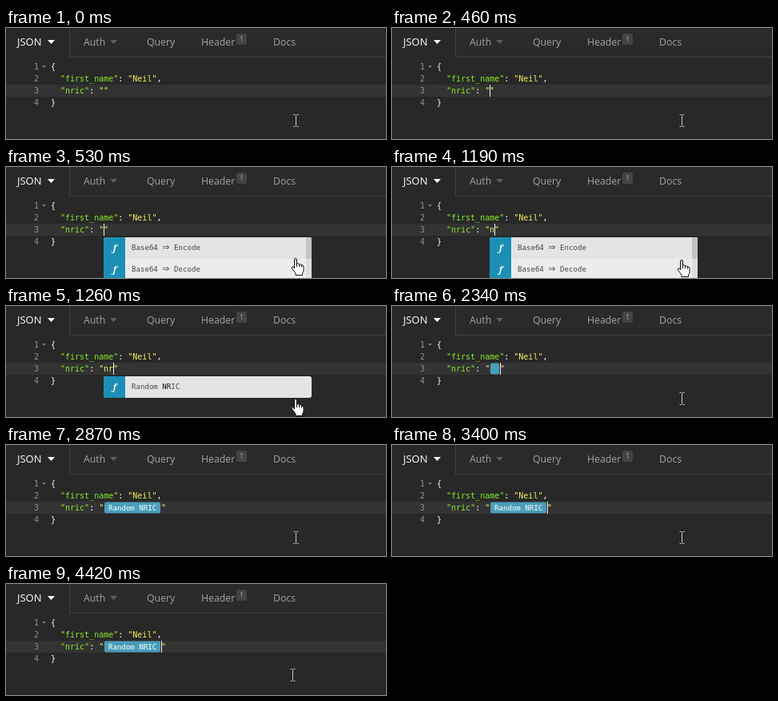
Write an HTML page that moves like this. It is 475x139 px and loops after 4.69 s.

```html
<!DOCTYPE html>
<html lang="en">
<head>
<meta charset="utf-8">
<style>
  html, body { margin: 0; width: 100%; height: 100%; overflow: hidden; background: #282828; }
  svg { display: block; }
  text { white-space: pre; }
  .tab { font: 12.3px "Open Sans", sans-serif; fill: #a3a3a3; }
  .code { font: 10px "DejaVu Sans Mono", monospace; fill: #fff; }
  .small { font: 9.1px "DejaVu Sans Mono", monospace; fill: #484848; }
  .arrow { font: 11px "DejaVu Sans", sans-serif; }
  .num { fill: #909090; }
  .key { fill: #86ee2c; }
  .str { fill: #f5ee62; }
  .hit { fill: #111; }
  .fn { font: italic 600 11px "Noto Serif", serif; fill: #fff; text-anchor: middle; }
  .beam { fill: none; stroke: #eee; mix-blend-mode: difference; }
</style>
</head>
<body>
<svg width="475" height="139" viewBox="0 0 475 139">
  <rect width="475" height="139" fill="#282828"/>
  <rect x="79" width="396" height="37" fill="#2a2a2a"/>
  <path d="M79.500 0V36.500H475" fill="none" stroke="#404040"/>
  <g class="tab">
    <text x="14" y="22" style="fill:#fff;font-size:13px">JSON</text>
    <text x="97" y="22">Auth</text>
    <text x="176" y="22">Query</text>
    <text x="244" y="22">Header</text>
    <text x="334" y="22">Docs</text>
  </g>
  <path d="M52 15h9l-4.500 5z" fill="#fff"/>
  <path d="M130 15h9l-4.500 5z" fill="#5a6064"/>
  <rect x="288" y="7" width="13" height="14" rx="2" fill="#444"/>
  <text x="294.500" y="17" text-anchor="middle" style="font:9px 'Open Sans',sans-serif;fill:#aaa">1</text>

  <rect y="71" width="475" height="15" fill="#333"/>
  <g class="code">
    <text class="num" x="35" y="52">1</text>
    <text class="num" x="35" y="67">2</text>
    <text class="num" x="35" y="82">3</text>
    <text class="num" x="35" y="97">4</text>
    <text x="56" y="52">{</text>
    <text x="68" y="67"><tspan class="key">"first_name"</tspan>: <tspan class="str">"Neil"</tspan>,</text>
    <text x="68" y="82"><tspan class="key">"nric"</tspan>: <tspan class="str">"</tspan></text>
    <text x="56" y="97">}</text>
  </g>
  <path d="M45 47h5l-2.500 3z" fill="#777"/>
  <g id="live"></g>
</svg>
<script>
const LOOP = 4690;
const live = document.getElementById('live');
const BEAM = 'beam', HAND = 'hand';
const TAG = 'Random NRIC';

// start time, typed text, caret on, popup rows, tag label (null: none), pointer, x, y
const states = [
  [0, '', 0, 0, null, BEAM, 362, 116],
  [460, '', 1, 0, null, BEAM, 362, 116],
  [530, '', 1, 2, null, HAND, 362, 114],
  [1060, '', 0, 2, null, HAND, 362, 114],
  [1190, 'n', 1, 2, null, HAND, 362, 116],
  [1260, 'nr', 1, 1, null, HAND, 362, 116],
  [1390, 'nri', 1, 1, null, BEAM, 362, 116],
  [1590, 'nric', 1, 1, null, BEAM, 362, 116],
  [2070, 'nric', 0, 1, null, BEAM, 362, 116],
  [2340, '', 1, 0, '', BEAM, 362, 116],
  [2410, '', 1, 0, TAG, BEAM, 362, 116],
  [2870, '', 0, 0, TAG, BEAM, 362, 116],
  [3400, '', 1, 0, TAG, BEAM, 362, 116],
  [3470, '', 1, 0, TAG, BEAM, 360, 115],
  [3540, '', 1, 0, TAG, BEAM, 358, 114],
  [3940, '', 0, 0, TAG, BEAM, 358, 114],
  [4420, '', 1, 0, TAG, BEAM, 358, 114]
];

const rect = (x, y, w, h, fill, rx = 0) =>
  `<rect x="${x}" y="${y}" width="${w}" height="${h}" rx="${rx}" fill="${fill}"/>`;
const text = (x, y, cls, s) => `<text x="${x}" y="${y}" class="${cls}">${s}</text>`;
const span = (cls, s) => `<tspan class="${cls}">${s}</tspan>`;

function popup(rows, typed) {
  if (!rows) return '';
  const n = typed.length;
  const labels = rows > 1
    ? ['Encode', 'Decode'].map(s => `Base64 ${span('arrow', '⇒')} ${s}`)
    : [`Random ${span('hit', 'NRIC'.slice(0, n))}${'NRIC'.slice(n)}`];
  const h = rows * 27;
  const list = rows > 1
    ? rect(149, 115, 226, 27, '#ececec') + rect(375, 88, 7, h, '#dedede', 2) +
      rect(375, 88, 7, 27, '#c4c4c4', 2)
    : '';
  return rect(122, 88, 260, h, '#e4e4e4', 3) + list +
    rect(122, 88, 27, h, '#1c8fb4', 3) + rect(145, 88, 4, h, '#1c8fb4') +
    labels.map((s, i) =>
      text(135.5, 105 + i * 27, 'fn', 'ƒ') + text(157, 104 + i * 27, 'small', s)).join('');
}

function pointer(kind, x, y) {
  if (kind === BEAM) {
    return `<path class="beam" transform="translate(${x + .5} ${y})"
      d="M-3 -7.500h2l1 1l1 -1h2M0 -6.500V6.500M-3 7.500h2l1 -1l1 1h2"/>`;
  }
  return `<g transform="translate(${x} ${y})" stroke="#111">
    <path fill="#fff" d="M-1.500 13V2Q-1.500 .5 0 .5T1.500 2V7Q4 6 4.500 8Q7 7 7.500 9
      Q10 8.500 10 11V15Q10 18 8.500 19V21.500H0V19L-4.500 13Q-5.500 11 -4 10.500Q-3 10.500 -1.500 13Z"/>
    <path fill="none" d="M1.500 7v4M4.500 8v3M7.500 9v2.500"/></g>`;
}

function draw([, typed, caret, rows, tag, kind, x, y]) {
  const tagW = tag === null ? 0 : tag ? 70 : 11;
  const end = tagW ? 124 + tagW : 122 + typed.length * 6;
  live.innerHTML =
    (tagW ? rect(123, 71.5, tagW, 14, '#4a9db8', 2) : '') +
    (tag ? `<text x="128" y="82" class="small" style="fill:#fff">${tag}</text>` : '') +
    text(122, 82, 'code str', typed) +
    text(end, 82, 'code str', '"') +
    (caret ? rect(end, 71, 1, 15, '#eee') : '') +
    popup(rows, typed) + pointer(kind, x, y);
}

let shown;
function frame() {
  const t = performance.now() % LOOP;
  const now = states.findLast(s => s[0] <= t);
  if (now !== shown) draw(shown = now);
  requestAnimationFrame(frame);
}
frame();
</script>
</body>
</html>
```
